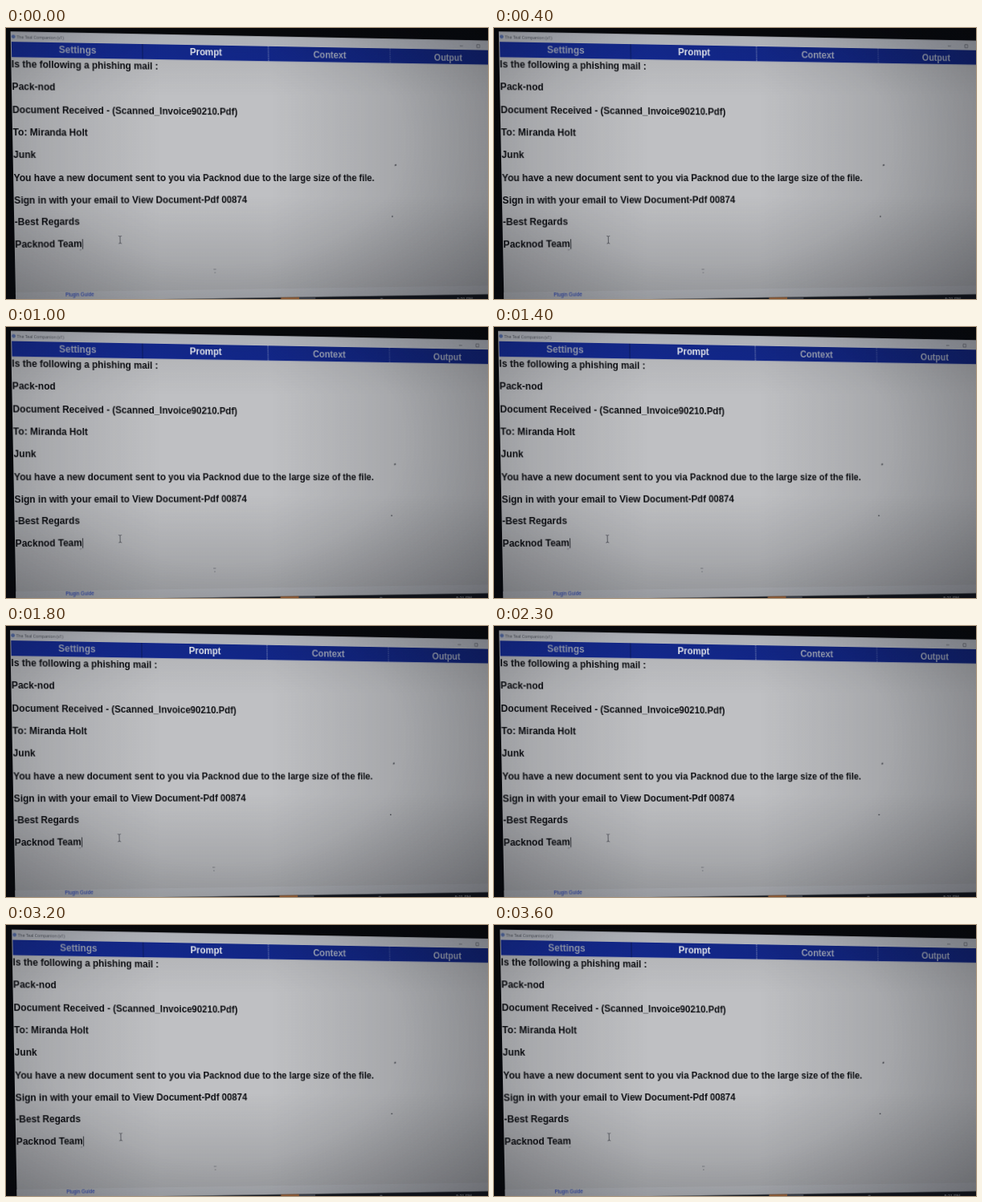
Recreate the animation shown at these times as an HTML page. Size 600 by 338 pixels, loop 3700 ms.

```html
<!DOCTYPE html>
<html lang="en">
<head>
<meta charset="utf-8">
<title>Prompt window</title>
<style>
  html, body { margin: 0; width: 100%; height: 100%; overflow: hidden; background: #07080b; }
  .stage { position: relative; width: 600px; height: 338px; overflow: hidden; }

  /* Hand-held camera drift, sampled ten times a second */
  .camera {
    position: absolute; inset: 0;
    transform-origin: 0 0;
    animation: drift 3.7s infinite;
  }
  @keyframes drift {
    0%       { transform: translate(0, 0) scale(1, 1); animation-timing-function: steps(4, end); }
    10.8108% { transform: translate(.3px, .1px) scale(.9995, .9997); animation-timing-function: steps(6, end); }
    27.027%  { transform: translate(.4px, .5px) scale(.9975, .9985); animation-timing-function: steps(4, end); }
    37.8378% { transform: translate(-.5px, .7px) scale(.9973, .9979); animation-timing-function: steps(4, end); }
    48.6486% { transform: translate(-.5px, 1px) scale(.9965, .997); animation-timing-function: steps(5, end); }
    62.1621% { transform: translate(.7px, 1.3px) scale(.9952, .9961); animation-timing-function: steps(6, end); }
    78.3783% { transform: translate(1.4px, 1.5px) scale(.9952, .9955); animation-timing-function: steps(7, end); }
    97.2972%, 100% { transform: translate(1.8px, 1.5px) scale(.9955, .9955); animation-timing-function: step-end; }
  }

  /* The monitor is seen slightly from the left */
  .screen {
    position: absolute; left: 0; top: 0;
    transform-origin: 0 190px;
    transform: matrix3d(1,0,0,.000103, 0,1,0,0, 0,0,1,0, 0,0,0,1) translateX(3.2px) skewX(1.117deg);
  }
  text { font-family: "Liberation Sans", Arial, sans-serif; }
  .tabs text { font-size: 12px; font-weight: 700; text-anchor: middle; fill: #a3aac0; }
  .tabs .on { fill: #eef1f8; }
  .mail text { font-size: 12.07px; font-weight: 700; fill: #0d0e12; }
  .small { font-family: "Open Sans", "Noto Sans", sans-serif; font-size: 5.2px; fill: #4c5059; }

  .caret { animation: blink .925s step-end infinite; }
  @keyframes blink { 0%, 93% { opacity: 1; } 60% { opacity: 0; } }

  .shade {
    position: absolute; inset: 0;
    background:
      linear-gradient(to bottom, rgba(8,10,16,.1), transparent 25%, transparent 62%, rgba(8,10,16,.2)),
      linear-gradient(to right, rgba(8,10,16,.16), transparent 32%, transparent 55%, rgba(8,10,16,.23)),
      radial-gradient(ellipse 75% 90% at 45% 42%, transparent 50%, rgba(8,10,16,.16));
  }
</style>
</head>
<body>
<div class="stage">
  <div class="camera">
    <svg class="screen" width="680" height="380" viewBox="0 0 680 380">
      <defs>
        <linearGradient id="bar">
          <stop offset="0" stop-color="#152c9a"/>
          <stop offset="1" stop-color="#11247f"/>
        </linearGradient>
      </defs>
      <rect x="6" y="4.4" width="674" height="337.6" fill="#bfc0c3"/>

      <rect x="6" y="4.4" width="674" height="13" fill="#bec1c8"/>
      <circle cx="9.5" cy="10.6" r="2.4" fill="#5b74b4"/>
      <text class="small" x="13.5" y="12.6">The Teal Companion (v1)</text>
      <path d="M600 12h4.5M624 9.8h4v4h-4z" fill="none" stroke="#5d6069" stroke-width=".7"/>

      <g class="tabs">
        <rect x="7" y="17" width="673" height="19.2" fill="url(#bar)"/>
        <path d="M173 17v19.2" stroke="#0b1a62"/>
        <path d="M338 17v19.2" stroke="#a9b4d8" stroke-width=".8" stroke-dasharray="1.5 1"/>
        <path d="M503 17v19.2" stroke="#6675b4" stroke-width=".8" stroke-dasharray="1.5 1"/>
        <text x="90" y="30.1">Settings</text>
        <text class="on" x="255.5" y="30.4">Prompt</text>
        <text x="420.5" y="31.2">Context</text>
        <text x="583.5" y="31.6">Output</text>
      </g>

      <g class="mail">
        <text x="6.6" y="48.9">Is the following a phishing mail :</text>
        <text x="6.6" y="76.8">Pack-nod</text>
        <text x="6.6" y="105.7">Document Received - (Scanned_Invoice90210.Pdf)</text>
        <text x="6.6" y="133.9">To: Miranda Holt</text>
        <text x="6.6" y="162.2">Junk</text>
        <text x="6.6" y="190.9">You have a new document sent to you via Packnod due to the large size of the file.</text>
        <text x="6.6" y="218.6">Sign in with your email to View Document-Pdf 00874</text>
        <text x="6.6" y="246.5">-Best Regards</text>
        <text x="6.6" y="274.3">Packnod Team</text>
      </g>
      <rect class="caret" x="91.2" y="264" width=".9" height="12.5" fill="#202329"/>

      <!-- pointer and dust on the glass -->
      <path d="M137.6 260.4q1.9 0 1.9 1.2q0-1.2 1.9-1.2M139.5 261v8.4M137.6 270q1.9 0 1.9-1.2q0 1.2 1.9 1.2" fill="none" stroke="#44474e" stroke-width=".8"/>
      <path d="M87.6 277.6q1.8 1.2 2.6-1" fill="none" stroke="#777a80" stroke-width=".7"/>
      <g fill="#3c3f45">
        <ellipse cx="507.7" cy="170" rx="1.3" ry=".9" transform="rotate(-35 507.7 170)"/>
        <circle cx="501.9" cy="237.3" r=".9"/>
      </g>
      <path d="M260 304h3.4M261 308.2h1.8" stroke="#7c7f85" stroke-width=".9"/>

      <rect x="6" y="330" width="674" height="11.5" fill="#c6c8cd"/>
      <text x="68.6" y="336.5" font-size="6.3" fill="#1c3cc4">Plugin Guide</text>

      <rect x="6" y="341.5" width="674" height="38.5" fill="#15181f"/>
      <rect x="348.5" y="341.5" width="24.5" height="9" fill="#b9743f"/>
      <rect x="373" y="342" width="22" height="8" fill="#4a4f5a"/>
      <circle cx="485" cy="346" r="2" fill="#70757f"/>
      <text x="589.5" y="348.6" font-size="6" fill="#d3d6dc">5:31 PM</text>
    </svg>
  </div>
  <div class="shade"></div>
</div>
</body>
</html>
```
